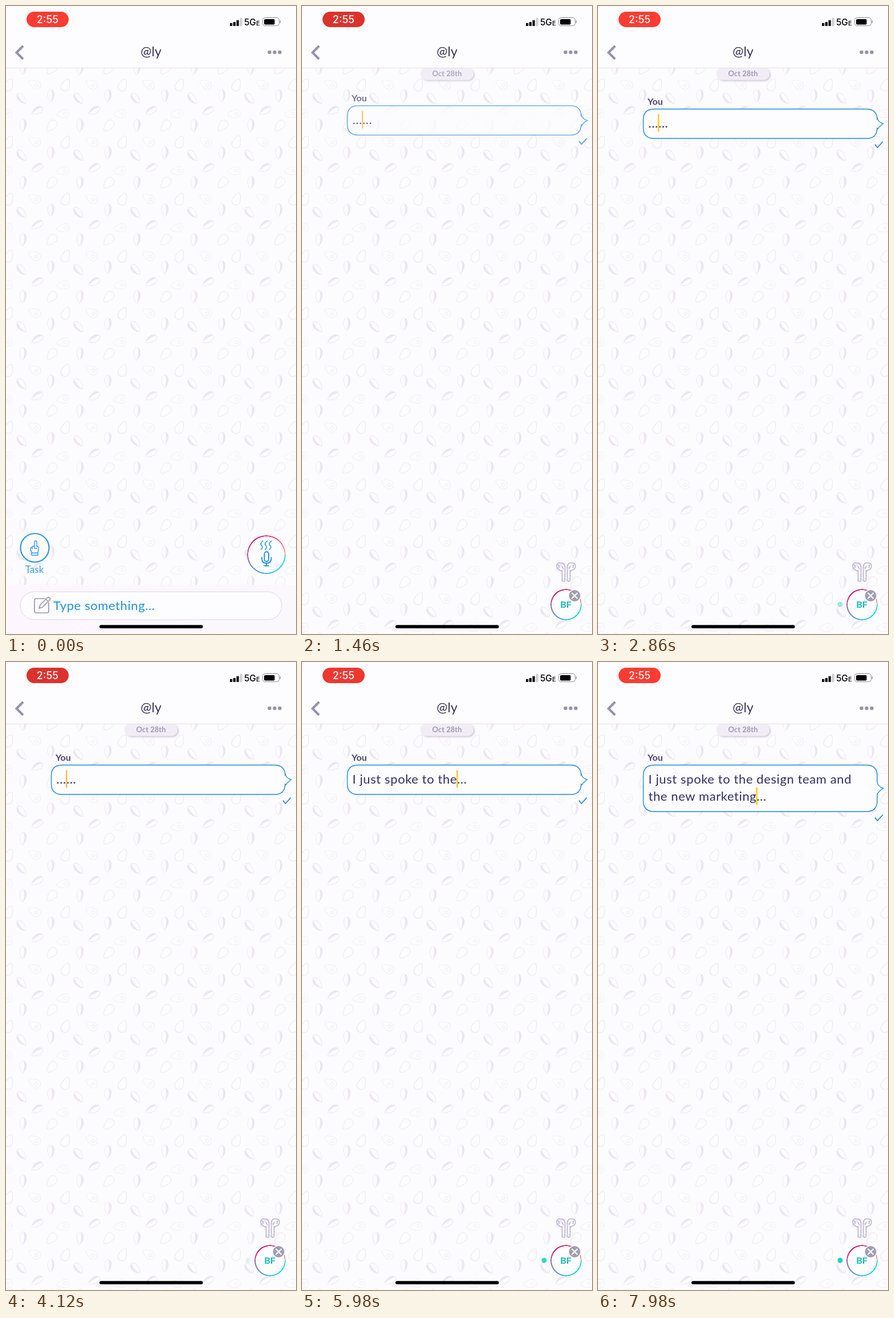
An HTML page for the animation above (8000 ms loop, 509 by 1100 pixels).

```html
<!DOCTYPE html>
<html lang="en">
<head>
<meta charset="utf-8">
<title>Voice message</title>
<style>
  html, body { margin: 0; width: 100%; height: 100%; overflow: hidden; background: #fcfbfe; }
  svg { display: block; width: 509px; height: 1100px; font-family: Lato, "Open Sans", sans-serif; }
  .line { fill: none; stroke-linecap: round; stroke-linejoin: round; }
  .ui { font-family: Inter, Roboto, sans-serif; }
  .body { font-size: 22px; letter-spacing: .6px; }
  .mid { text-anchor: middle; }
  .ring {
    width: 100%; height: 100%; border-radius: 50%;
    background: conic-gradient(#e0206e, #ee5f7c 40deg, #f4a48c 88deg, #1edcd0 92deg, #22cfd8 150deg,
      #30b8de 185deg, #5a8cc8 225deg, #a8489c 275deg, #cc1476 310deg, #e0206e);
    -webkit-mask: radial-gradient(closest-side, #0000 calc(100% - 2.4px), #000 calc(100% - 1.8px));
    mask: radial-gradient(closest-side, #0000 calc(100% - 2.4px), #000 calc(100% - 1.8px));
  }
</style>
</head>
<body>
<svg viewBox="0 0 509 1100">
  <defs>
    <g id="pear" class="line" stroke="#e9e5ee">
      <path d="M0-12C4-12 5-6 7-1C10 7 6 12 0 12S-10 7-7-1C-5-6-4-12 0-12Z"/>
    </g>
    <g id="faint" opacity=".65">
      <use href="#pear"/>
      <circle cy="4" r="3" fill="none" stroke="#e9e5ee"/>
    </g>
    <g id="half">
      <path d="M0-12C-8-11-9 4 0 13" class="line" stroke="#ebe7f0"/>
      <path d="M0-12C9-10 9 5 0 13C3 4 3-4 0-12Z" fill="#ebe6f1"/>
    </g>
    <pattern id="fruit" width="100" height="100" patternUnits="userSpaceOnUse"></pattern>
    <linearGradient id="panel">
      <stop stop-color="#fef6fe"/><stop offset="1" stop-color="#faf8fd"/>
    </linearGradient>
    <filter id="soft" x="-20%" y="-30%" width="140%" height="180%">
      <feDropShadow dx="2" dy="2" stdDeviation="1.5" flood-color="#8a80a0" flood-opacity=".4"/>
    </filter>
  </defs>

  <rect width="509" height="1100" fill="#fcfbfe"/>
  <rect y="109" width="509" height="991" fill="url(#fruit)"/>

  <g id="date">
    <rect x="208" y="107.5" width="93" height="22" rx="11" fill="#f1ecf6" filter="url(#soft)"/>
    <text x="254.5" y="123" class="mid" font-size="13" font-weight="700" fill="#a09ab2">Oct 28th</text>
  </g>

  <!-- header -->
  <rect width="509" height="108" fill="#fdfcff"/>
  <path d="M0 108.5H509" stroke="#e5e0e8"/>
  <rect id="pill" x="36" y="10" width="74" height="27" rx="13.5"/>
  <text x="73" y="30" class="ui mid" font-size="18" font-weight="500" fill="#fff">2:55</text>
  <path d="M393 30h4.2v5h-4.2zM398.7 28h4.2v7h-4.2zM404.5 25h4.2v10h-4.2z"/>
  <path d="M410.5 21h4.2v14h-4.2z" fill="#d2ccd2"/>
  <text x="418" y="34" class="ui" font-size="15.5" font-weight="500">5G<tspan font-size="11">E</tspan></text>
  <rect x="450.5" y="20.5" width="29" height="14" rx="4" fill="none" stroke="#8d8a92"/>
  <rect x="453" y="23" width="18.5" height="9.5" rx="2"/>
  <path d="M481.5 25.5v4" stroke="#8d8a92" stroke-width="1.5"/>
  <path d="M30 70L18.5 81.5L30 93" fill="none" stroke="#9490ae" stroke-width="4"/>
  <text x="254.5" y="88" class="mid" font-size="23" fill="#38345c">@ly</text>
  <g fill="#9692aa">
    <circle cx="462.5" cy="81" r="3.2"/><circle cx="471.5" cy="81" r="3.2"/><circle cx="480.5" cy="81" r="3.2"/>
  </g>

  <!-- idle controls -->
  <g id="buttons">
    <g class="line" stroke="#2f98e4">
      <circle cx="50.5" cy="949" r="25" fill="#fdfcff" stroke-width="2.2"/>
      <path stroke-width="1.4" d="M50 950V939q0-2 2-2t2 2V947q3-1 3 2v5q0 2-2 4H46q-3-3-3-7q0-3 3-3v-1q2-2 4 0M46 948v3M50 950h4M45 958h11v4H45z"/>
    </g>
    <text x="50" y="992.5" class="mid" font-size="17" fill="#3aa0e6">Task</text>
    <circle cx="457" cy="961" r="33" fill="#fdfcff"/>
    <foreignObject x="423" y="927" width="68" height="68"><div class="ring"></div></foreignObject>
    <g class="line" stroke="#2191dd" stroke-width="1.9">
      <rect x="453.5" y="956" width="7.5" height="17" rx="3.75"/>
      <path d="M449 966v2q0 8 8.25 8t8.25-8v-2M457.25 976v4M453.5 980.5h7.5"/>
      <path stroke-width="1.6" d="M451 937q-6 5-2.5 8t-1 7M458.5 937q-6 5-2.5 8t-1 7M466 937q-6 5-2.5 8t-1 7"/>
    </g>
  </g>
  <g id="footer">
    <rect y="1014" width="509" height="86" fill="url(#panel)"/>
    <rect x="25" y="1026" width="459" height="49" rx="24.5" fill="#fdfcff" stroke="#d8d5e6"/>
    <g class="line" stroke="#9a97ac" stroke-width="1.7">
      <path d="M68 1038H53q-3 0-3 3v19q0 3 3 3h19q3 0 3-3v-15"/>
      <path d="M58 1055l2-6 13-13q2-1 4 1q1 2 0 3l-13 13zM70 1039l4 4"/>
    </g>
    <text x="83" y="1058" class="body" fill="#2191dd">Type something...</text>
  </g>

  <!-- recording controls -->
  <g id="record">
    <g class="line" stroke="#b0abc4" stroke-width="1.4">
      <path id="bud" d="M456.5 1007V989q-3 1-4-1q-5-1-5.500-7q0-5.500 5-5.500q9-1 9.500 7V1007q-2.500 1.500-5 0ZM456 982q2 1 2.500 4M449.500 979q2.500 1 1.500 5"/>
      <use href="#bud" transform="matrix(-1 0 0 1 927 0)"/>
    </g>
    <circle cx="463" cy="1048" r="26" fill="#fdfcff"/>
    <foreignObject x="435.5" y="1020.5" width="55" height="55"><div class="ring"></div></foreignObject>
    <text x="463" y="1053.5" class="mid" font-size="16" font-weight="700" fill="#14bab4">BF</text>
    <circle cx="478.5" cy="1033" r="10.7" fill="#a19db2" stroke="#fcfbfe" stroke-width="1.5"/>
    <path class="line" d="M474 1028.5l9 9m0-9l-9 9" stroke="#fff" stroke-width="2"/>
  </g>
  <circle id="dot" cx="425" cy="1048" r="4.5" fill="#14cfc6"/>

  <g id="message">
    <text x="87" y="173" font-size="16" font-weight="700" fill="#48436c">You</text>
    <path id="bubble" fill="#fdfcff" stroke="#2288d6" stroke-width="1.4"/>
    <text id="row1" class="body" x="88.5" y="212.5" fill="#322e66"></text>
    <text id="row2" class="body" x="88.5" y="242.5" fill="#322e66"></text>
    <rect id="caret" width="2.6" height="31" rx="1"/>
    <path id="tick" class="line" d="M486.5 11l4 5 9-10" stroke="#2288d6" stroke-width="1.8"/>
  </g>
  <rect x="164" y="1084.3" width="181.5" height="5.7" rx="2.8"/>
</svg>
<script>
const LOOP = 8000, ROWS = ["I just spoke to the design team and", "the new marketing"];
// when each spoken word appears
const WORD_TIMES = [4750, 5000, 5500, 5800, 5950, 6250, 6550, 6980, 7250, 7480, 7800];
const el = Object.fromEntries([...document.querySelectorAll("[id]")].map(e => [e.id, e]));
const set = (name, attrs) => { for (const k in attrs) el[name].setAttribute(k, attrs[k]); };
const mix = (a, b, p) => `rgb(${a.map((v, i) => v + (b[i] - v) * p)})`;
const ramp = (t, from, to) => {
  const p = Math.min(1, Math.max(0, (t - from) / (to - from)));
  return p * p * (3 - 2 * p);
};
const wave = (t, period, peak) => .5 + .5 * Math.cos((t - peak) / period * 2 * Math.PI);

// background tile: shape, x, y, angle, mirrored
const FRUIT = [
  ["pear", 5, 38, 22], ["faint", 50, 37, -60], ["half", 27, 62, -40, 1], ["half", 79, 57, 2],
  ["half", 55, 83, 58, 1], ["faint", 0, 89, -98], ["half", 30, 9, 4], ["pear", 80, 10, 222]
];
let tile = "";
for (const [shape, x, y, angle, flip] of FRUIT)
  for (const dx of [-100, 0, 100])
    for (const dy of [-100, 0, 100])
      tile += `<use href="#${shape}" transform="translate(${x + dx} ${y + dy}) rotate(${angle}) scale(${flip ? -.92 : .92} .92)"/>`;
el.fruit.innerHTML = tile;

function bubblePath(bottom) {
  const c = (180.5 + bottom) / 2;
  return `M98.500 180.500H471q19 0 19 19V${c - 11}q1 8 10.500 11q-5 3-10.500 10V${bottom - 19}
    q0 19-19 19H98.500q-19 0-19-19V199.500q0-19 19-19Z`;
}

function drawText(t) {
  const spoken = WORD_TIMES.filter(w => w <= t).length;
  const first = ROWS[0].split(" "), second = ROWS[1].split(" ");
  const rows = [
    first.slice(0, spoken).join(" ") || "...",
    second.slice(0, Math.max(0, spoken - first.length)).join(" ")
  ];
  const last = rows[1] ? 1 : 0;
  el.row1.textContent = rows[0] + (last ? "" : "...");
  el.row2.textContent = last ? rows[1] + "..." : "";
  const row = last ? el.row2 : el.row1;
  set("caret", {
    x: 87.5 + row.getSubStringLength(0, rows[last].length), y: 189.5 + 30 * last,
    fill: mix([243, 190, 74], [250, 208, 20], wave(t, 2550, 245))
  });
}

function draw(t) {
  set("pill", { fill: mix([219, 50, 44], [255, 59, 50], wave(t, 2550, 245)) });

  const leave = ramp(t, 300, 650);
  set("buttons", { opacity: 1 - leave });
  set("footer", { opacity: 1 - leave, transform: `translate(0 ${leave * 86})` });
  set("record", { opacity: ramp(t, 600, 950) });
  set("date", { opacity: ramp(t, 1050, 1600) });

  const enter = ramp(t, 1100, 1640);
  set("message", { opacity: enter, transform: `translate(0 ${-23 * (1 - enter)})` });
  const bottom = 232 + 30 * ramp(t, 7200, 7350);
  set("bubble", { d: bubblePath(bottom) });
  set("tick", { transform: `translate(0 ${bottom})` });
  drawText(t);

  set("dot", { opacity: ramp(t, 1650, 1850) * (.1 + .9 * wave(t, 1100, 8046)) });
}

const start = performance.now();
function frame() {
  draw((performance.now() - start) % LOOP);
  requestAnimationFrame(frame);
}
frame();
</script>
</body>
</html>
```
